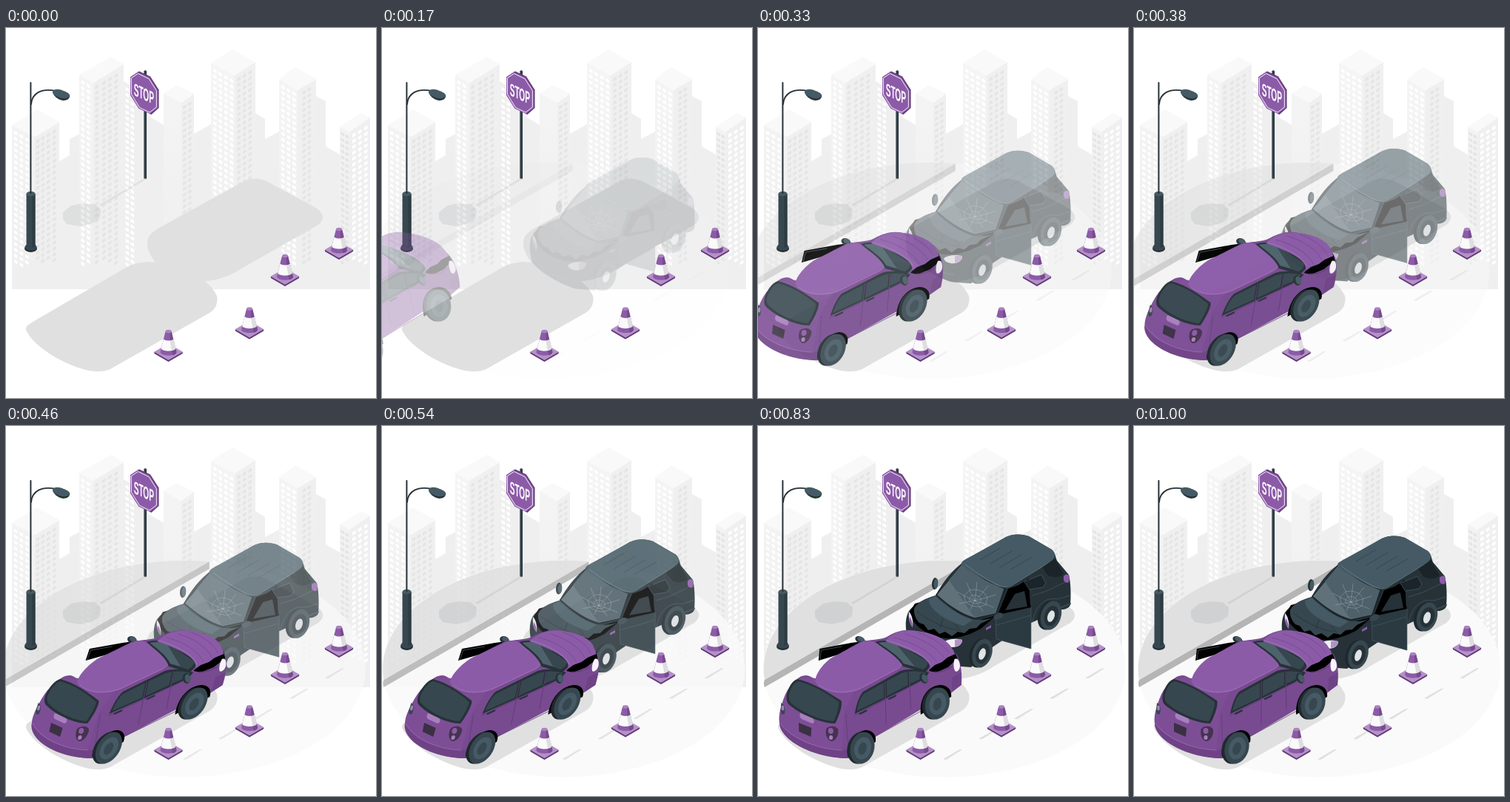
Write an HTML page that moves like this. It is 500x500 px and loops after 1040 ms.

```html
<!DOCTYPE html>
<html lang="en">
<head>
<meta charset="utf-8">
<title>Car crash scene</title>
<style>
html, body { margin: 0; width: 100%; height: 100%; overflow: hidden; background: #fff; }
svg { display: block; width: 100vw; height: 100vh; }
.line { fill: none; stroke-linecap: round; stroke-linejoin: round; }
</style>
</head>
<body>
<svg id="stage" viewBox="0 0 500 500"></svg>
<script>
const shape = (d, fill, extra = '') => `<path d="${d}" fill="${fill}" ${extra}/>`;
const line = (d, color, width = 1, extra = '') =>
  `<path class="line" d="${d}" stroke="${color}" stroke-width="${width}" ${extra}/>`;
const oval = (x, y, rx, ry, fill, turn = 0) =>
  `<ellipse cx="${x}" cy="${y}" rx="${rx}" ry="${ry}" fill="${fill}" transform="rotate(${turn} ${x} ${y})"/>`;
const DARK = '#263238', SLATE = '#37474f', STEEL = '#455a64';
const LILAC = '#8c5ba8', PURPLE = '#784a90', DEEP = '#653b7b';

// ---- city ----
const ISO = 0.577;

function windows(cols, x0, y0, slope, fill) {
  let d = '';
  for (const x of cols)
    for (let y = y0 + (x - x0) * slope + 6; y < 317; y += 7.9)
      d += `M${x} ${y.toFixed(1)}l4.6 ${4.6 * slope}v4.2l-4.6 ${-4.6 * slope}z`;
  return shape(d, fill);
}

function tower({ left, top, right, front, cl = [], cr = [], wl = '#fff', wr = '#e5e5e5' }) {
  const [lx, ly] = left, [rx, ry] = right, [fx, fy] = front;
  return shape(`M${lx} ${ly}L${fx} ${fy}V353H${lx}z`, 'url(#faceL)') +
    shape(`M${fx} ${fy}L${rx} ${ry}V353H${fx}z`, 'url(#faceR)') +
    shape(`M${left}L${top}L${right}L${front}z`, '#f9f9f9') +
    windows(cl, lx, ly, ISO, wl) + windows(cr, fx, fy, -ISO, wr);
}

const city =
  shape('M8 353V131L72 180L86 172V150L100 143L159 72L188 89V116L213 131L254 143L277 130' +
    'L337 115L350 123V150L369 140L419 92L432 99V160L451 171L492 180V353z', '#efefef') +
  windows([161.5, 168.5], 159, 72, ISO, '#fff') +
  tower({ left: [8, 131], top: [42, 110], right: [72, 127], front: [39, 147],
    cl: [11, 18.5, 26], cr: [40.5, 47.5, 55, 63] }) +
  tower({ left: [99, 63], top: [142, 39], right: [159, 49], front: [118, 74],
    cl: [101.5, 109], cr: [120.5, 130, 138, 146.5] }) +
  tower({ left: [213, 88], top: [231, 77], right: [254, 89], front: [237, 101],
    cr: [239, 246] }) +
  tower({ left: [277, 47], top: [306, 29], right: [337, 46], front: [309, 64],
    cl: [280, 287.5, 295, 302.5], cr: [312.5, 320, 327.5] }) +
  tower({ left: [369, 69], top: [391, 53], right: [419, 69], front: [394, 84],
    cl: [372, 379.5, 387], cr: [400.5, 407.5] }) +
  tower({ left: [451, 133], top: [480, 115], right: [492, 121], front: [464, 140],
    cl: [452.5, 458.5], cr: [468, 476, 484], wl: '#e5e5e5', wr: '#fff' });

// ---- ground ----
const dashes = [0, 1, 2, 3, 4].map(i =>
  `M${249 + 48 * i} ${449.5 - 27.4 * i}l21.5 -12.4h4l-21.5 13.6h-4z`).join('');
const floor =
  oval(250, 328, 245, 146.5, '#fafafa') +
  shape('M7 343L284 183V193L7 353C5.5 350 5.5 346 7 343z', '#b5b5b5') +
  shape('M7 343A245 146.5 0 0 1 284 183z', '#e0e0e0') +
  shape(dashes, '#e0e0e0');

const shadows =
  shape('M191 291C191 281 197 276 207 270L318 209C330 202 340 202 352 207L415 241' +
    'C430 249 432 258 422 266L320 324C296 340 272 345 245 341C212 333 191 310 191 291z', '#e0e0e0') +
  shape('M27 408C26 402 32 400 38 396L160 325C175 316 190 315 206 317C240 322 276 340 285 362' +
    'C287 372 283 380 275 385L146 458C135 465 125 465 112 463C80 456 38 432 27 408z', '#e0e0e0');

const signShadow = `<g opacity=".08">${
  shape('M77 249L88 240L103 237L120 238L128 245L127 257L117 264L100 268L82 265L77 258z', DARK) +
  shape('M126 239L187 203L190 204L128 241z', DARK)}</g>`;

// ---- street furniture ----
const lamp =
  oval(33.5, 298, 8.5, 5, DARK) + oval(33.5, 296, 8, 4.5, SLATE) +
  shape('M27.5 224V294C29 298 38 298 39.5 294V224z', SLATE) +
  shape('M35.5 224V297C38 296 39.5 295 39.5 294V224z', '#2d3c43') +
  oval(33.5, 224, 6, 3.2, STEEL) +
  line('M33.4 74V223', DARK, 2) +
  line('M34 103C35 88 48 81 67 85', DARK, 1.8) +
  shape('M63 86C63 90 69 97 77 98C83 98 87 95 86 90z', DARK) +
  shape('M63 86C65 82 71 82 78 85C84 87 87 90 86 92C84 96 77 96 72 94C67 92 63 89 63 86z', STEEL);

const sign =
  shape('M186.3 58C187 57 189 57 190 58V203C189 204 187 204 186.3 203z', SLATE) +
  line('M189.4 59V203', DARK, 1.2) +
  shape('M178 59.5L180 58.5L195 65.5L206.5 83.5V108L196.5 117L194 116z', DEEP) +
  shape('M168 66L178 59.5L194 67L205 84V108L194.5 116L179.5 109L168 91z', LILAC) +
  line('M169.7 67.3L178.5 61.6L193 68.5L203.3 84.7V107L194 114L180.5 107.5L169.7 90z', '#fff', 0.9) +
  `<text transform="matrix(.43 .2 0 1 186.3 97)" text-anchor="middle" font-size="23.5" font-weight="700"
    fill="#fff" font-family="'Liberation Sans', Arial, sans-serif">STOP</text>`;

const cone = ([x, y]) => `<g transform="translate(${x} ${y})">${
  shape('M-21 30.5L0 18L21 30.5L0 43.5z', '#e8dfed') +
  shape('M-19 29.5L0 40.5L19 29.5V32L0 43L-19 32z', DEEP) +
  shape('M-19 29.5L0 18.5L19 29.5L0 40.5z', '#b391c6') +
  shape('M-4 2L-11 30C-10 36 10 36 11 30L4 2z', LILAC) +
  shape('M-6.6 12.5C-4 15 4 15 6.6 12.5L9.8 25.5C7 29.5 -7 29.5 -9.8 25.5z', '#fafafa') +
  shape('M2 14.2C4 14 5.5 13.5 6.6 12.5L9.8 25.5C8.7 27 7 27.8 4.5 28.2z', '#dedede') +
  shape('M2 4L4 2L6.6 12.5C5.5 13.5 4 14 2 14.2z', PURPLE) +
  shape('M4.5 28.2C7 27.8 8.7 27 9.8 25.5L11 30C10.5 32.5 8 33.8 5.5 34.2z', PURPLE) +
  oval(0, 2, 4, 2.2, '#a982bf')}</g>`;
const cones = [[450, 270], [377, 306], [329, 377.5], [219.5, 408]].map(cone).join('');

// ---- cars ----
const wheel = (x, y, rx, ry, hub, cap) =>
  oval(x - 2, y, rx, ry, '#1e292e', 18) + oval(x + 2, y, rx, ry, SLATE, 18) +
  oval(x + 2.5, y + 0.5, rx * 0.7, ry * 0.7, hub, 18) +
  oval(x + 2, y + 1, rx * 0.34, ry * 0.4, cap, 18);

function cracks(x, y) {
  const tips = [[-24, -12], [-11, -24], [3, -25], [18, -20], [28, -8], [25, 9], [11, 14], [-6, 12], [-21, 4]];
  let d = tips.map(([a, b]) => `M${x} ${y}l${a * 0.5} ${b * 0.45}l${a * 0.5} ${b * 0.55}`).join('');
  for (const r of [0.3, 0.6])
    d += 'M' + tips.map(([a, b]) => `${x + a * r} ${y + b * r}`).join('L') + 'z';
  return line(d, '#b4bfc4', 0.5, 'opacity=".75"');
}

const blackCar =
  oval(239, 215, 4, 8, DARK, 5) + oval(240.5, 215, 2.8, 7, STEEL, 5) +
  shape('M276 187L335 152C346 147 357 148 366 151L397 169C402 173 402 180 404 184L420 203' +
    'C423 215 423 232 422 244C420 248 415 250 410 250L369 268V303L330 292L318 300L288 328L262 326' +
    'C235 318 210 300 203 290C198 275 199 260 204 252C210 244 220 238 240 231C250 212 262 198 276 187z', DARK) +
  // windshield
  shape('M277 188L240 230C255 245 275 258 292 264L322 257L336 222C315 214 295 202 277 188z', '#1c272c') +
  shape('M276 189L242 230C256 243 275 256 293 261L321 255L332 222C312 215 292 202 276 189z', '#60717a') +
  shape('M276 189L258 210L292 260L321 255L332 222C312 215 292 202 276 189z', '#4e6069') +
  cracks(293, 238) +
  // roof
  shape('M275 187C277 183 283 181 288 178L335 152C346 147 357 148 366 151L397 169C403 174 402 181 396 185' +
    'L345 216C337 221 328 221 319 216L290 200C282 196 276 191 275 187z', STEEL) +
  line('M300 183L327 167M314 188L343 171M327 193L356 176M341 196L371 179', SLATE, 1) +
  line('M280 189C300 204 318 215 330 219C337 221 342 219 347 215L399 183', '#78909c', 0.6) +
  // hood and torn front edge
  shape('M205 253C207 268 222 281 243 287C263 293 284 285 301 276L322 258L292 266L238 235L212 242z', '#000') +
  shape('M240 231C226 235 215 240 211 249C210 257 214 264 218 268L224 270L230 278L238 276L245 283L253 280' +
    'L262 286L270 280L279 282L286 276L295 275L301 269L320 260C310 264 300 265 290 263C272 257 255 245 240 231z', SLATE) +
  shape('M231 236C230 248 250 264 278 272L290 264C270 257 253 245 240 232z', STEEL) +
  line('M215 253C230 264 252 276 270 278M250 262L246 274M266 270L274 279', DARK, 0.8) +
  // front lights and bumper
  shape('M204 253C208 257 210 265 209 274C205 270 203 261 204 253z', '#e9dff0') +
  shape('M205 260C208 264 209 270 209 274C206 271 204 266 205 260z', LILAC) +
  shape('M251 294C258 289 268 289 276 291C276 297 271 301 262 301C256 300 252 298 251 294z', '#f2edf5') +
  shape('M266 291C270 290 274 290 276 291C276 297 271 300 266 300z', '#b391c6') +
  line('M204 284C217 300 240 313 264 316', SLATE, 1.5) +
  shape('M308 275L315 271V274.5L308 278z', LILAC) +
  // doorway, open door, side glass
  shape('M338 222L352 217L366 208L368 250L340 257L325 254z', '#000') +
  shape('M321 261C323 256 330 254 338 252L369 245V303L322 290z', '#2b3a41') +
  shape('M329 256L344 227L362 221L369 247L338 254z', '#000') +
  shape('M334 251L347 229L360 225L364 246z', DARK) +
  line('M321 262L322 290L369 303V247M322 271L368 258', '#4c5f68', 0.6) +
  shape('M360 212L383 203L389 214L385 220L367 223z', '#1b2529') +
  line('M360 212L383 203L389 214L385 220L367 223z', STEEL, 0.8) +
  shape('M384 193L401 181L413 202C408 207 398 208 391 203z', '#1b2529') +
  line('M371 267C374 246 388 232 405 236L421 231M371 231L390 225L419 211', STEEL, 0.7) +
  shape('M413 205C416 201 420 202 421 206L420 213C417 215 414 213 413 210z', LILAC) +
  line('M410 247L422 242', SLATE, 2) +
  oval(325, 259, 7, 4, SLATE, -20) +
  wheel(394, 258, 13.5, 20, DARK, '#dfe4e6') + wheel(301, 309, 13, 20, DARK, '#dfe4e6');

const purpleCar =
  shape('M83 317L85 301L128 293L150 290L120 306z', '#000') +
  line('M85 316L87 303L115 298', '#455a64', 0.8) +
  oval(140, 289, 7, 4.5, DARK, 25) + oval(141, 288, 5, 3, STEEL, 25) +
  // shell
  shape('M78 343C85 326 98 314 140 292C152 288 168 290 178 284C190 277 202 274 216 277C238 280 252 286 261 297' +
    'L270 309C276 320 277 338 275 350L262 360L238 372L150 424L126 449C98 450 62 441 40 423C31 414 26 404 28 391' +
    'C30 376 40 357 52 343C60 336 68 334 78 343z', PURPLE) +
  shape('M78 341C62 339 50 344 40 357C31 372 28 390 29 403C45 426 78 438 111 440L116 386L131 357z', '#7d4e96') +
  shape('M28 402C44 425 80 437 112 438L126 436L124 449C94 450 57 440 38 421C31 414 28 408 28 402z', '#6f4286') +
  line('M29 402C46 424 80 437 111 438', '#9a6cb2', 0.8) +
  // roof
  shape('M78 343C80 332 92 318 103 312L140 293C148 289 156 290 161 293L192 315C197 320 196 325 190 328' +
    'L137 356C120 363 100 361 88 354C80 350 77 347 78 343z', LILAC) +
  line('M82 350C98 362 120 362 138 355L190 328C196 324 197 320 192 315L161 293', '#a47abb', 0.8) +
  // back glass, lights, plate
  shape('M39 362C42 352 47 344 54 342C75 347 95 360 112 371C115 376 107 397 103 402C84 402 55 389 41 376C38 372 38 367 39 362z', DARK) +
  shape('M42 362C45 353 49 346 55 345C75 350 93 361 109 373C110 378 104 394 101 399C83 398 57 386 44 374C41 370 41 366 42 362z', SLATE) +
  shape('M57 388L73 395C76 398 75 402 72 402L58 396C55 394 55 389 57 388z', '#a77fbd') +
  shape('M54 401L71 408L70 420L54 413z', '#3b3044') +
  shape('M31 374C35 376 37 381 35 389C32 391 30 389 30 384z', SLATE) + oval(33, 381, 1.8, 3.5, '#a77fbd', 0) +
  shape('M91 409C96 404 104 405 107 410C108 418 103 426 97 426C91 424 89 415 91 409z', '#46334f') +
  oval(97, 412, 3.5, 4, LILAC) + oval(97, 421, 2.6, 3, '#a77fbd') +
  // windscreen
  shape('M160 292C170 289 182 289 193 293L234 318C235 323 232 329 226 333L197 325C191 312 174 303 160 292z', DARK) +
  shape('M165 293C174 291 184 292 191 295L230 318C231 322 229 326 224 329L198 321C192 311 178 302 165 293z', SLATE) +
  shape('M165 293C174 291 181 292 188 294L213 325L198 321C192 311 178 302 165 293z', '#4d626b') +
  // side glass
  shape('M130 389C132 378 136 366 142 359L193 331C205 327 220 329 232 333C228 341 218 346 206 352z', DARK) +
  shape('M133 385C135 376 138 367 143 362L170 347V367z', SLATE) +
  shape('M174 345L195 334L203 332V350L174 365z', SLATE) +
  shape('M206 332C214 331 222 332 228 334C224 340 216 344 206 348z', SLATE) +
  line('M172 346V403M205 332L206 382M130 391L228 341', DEEP, 1) +
  line('M118 389C119 405 119 420 120 430M156 420L220 385', DEEP, 0.8) +
  line('M137 389L146 384.5M177 369L186 364.5', DARK, 2) +
  // hood and crushed front
  shape('M237 323L267 305L271 314L258 326L242 333L232 331z', '#000') +
  shape('M174 291C183 279 200 274 217 277C238 280 253 286 261 296L268 308L257 313L250 319L240 323L234 328' +
    'C234 318 222 310 206 303C195 298 184 294 174 291z', LILAC) +
  line('M186 286C208 291 232 303 243 319M201 281C222 287 243 298 253 313M218 279C237 285 252 295 260 307', PURPLE, 0.9) +
  line('M176 290C200 296 228 309 234 322', '#a47abb', 0.8) +
  shape('M267 315C271 313 274 318 274 325C273 331 269 333 267 331C265 327 265 319 267 315z', '#f7f3f9') +
  shape('M263 340L275 333V350L262 359z', '#6f4286') +
  line('M240 332C247 333 256 330 263 325', DEEP, 1) +
  // wheels and mirror
  shape('M219 390C218 367 229 352 246 350C257 350 262 357 261 366z', '#000') +
  shape('M119 447C116 429 127 414 144 411C154 411 159 418 157 427z', '#000') +
  wheel(240, 375, 16, 22, STEEL, SLATE) + wheel(137, 435, 16, 22, STEEL, SLATE) +
  oval(224.5, 341, 5, 7.5, DARK, -28) + oval(226, 341, 3.5, 6, STEEL, -28);

const gradient = (id, top) => `<linearGradient id="${id}" gradientUnits="userSpaceOnUse" x1="0" y1="40" x2="0" y2="320">
  <stop stop-color="${top}"/><stop offset="1" stop-color="#efefef"/></linearGradient>`;
const stage = document.getElementById('stage');
stage.innerHTML = `<defs>${gradient('faceL', '#f5f5f5') + gradient('faceR', '#f0f0f0')}</defs>
  ${city}<g id="floor">${floor}</g>${shadows + signShadow + lamp + sign}
  <g id="black">${blackCar}</g><g id="purple">${purpleCar}</g>${cones}`;

// ---- motion ----
const LOOP = 1040, STEP = 1000 / 24, LEAD = 0.0155;
const part = id => document.getElementById(id);
const ground = part('floor'), black = part('black'), purple = part('purple');

// cubic-bezier(.36, -.01, .5, 1.38)
function ease(x) {
  if (x <= 0) return 0;
  if (x >= 1) return 1;
  const curve = (s, a, b) => 3 * (1 - s) ** 2 * s * a + 3 * (1 - s) * s * s * b + s ** 3;
  let lo = 0, hi = 1;
  for (let i = 0; i < 30; i++) {
    const mid = (lo + hi) / 2;
    if (curve(mid, 0.36, 0.5) < x) lo = mid; else hi = mid;
  }
  return curve(lo, -0.01, 1.38);
}

function pose(el, transform, opacity) {
  el.setAttribute('transform', transform);
  el.setAttribute('opacity', Math.max(0, Math.min(1, opacity)));
}

// Rushes in leaning, overshoots, then settles.
function rush(x) {
  const p = ease(x / 0.6);
  if (x < 0.6) return { dx: -250 * (1 - p), lean: 0.364 - 0.54 * p, alpha: p };
  if (x < 0.8) return { dx: 0, lean: -0.176 + 0.211 * ease((x - 0.6) / 0.2), alpha: 1 };
  return { dx: 0, lean: 0.035 * (1 - ease((x - 0.8) / 0.2)), alpha: 1 };
}

function draw() {
  const n = Math.floor((performance.now() % LOOP + 4.99) / STEP);
  const x = n < 2 ? 0 : Math.min(1, n / 24 + LEAD);
  const e = ease(x), slide = 30 * (1 - e);
  pose(ground, `translate(${-slide} 0)`, e);
  pose(black, `translate(0 ${slide})`, e);
  const { dx, lean, alpha } = rush(x);
  pose(purple, `matrix(1 0 ${lean} 1 ${dx - lean * 362} 0)`, alpha);
  requestAnimationFrame(draw);
}
draw();
</script>
</body>
</html>
```
